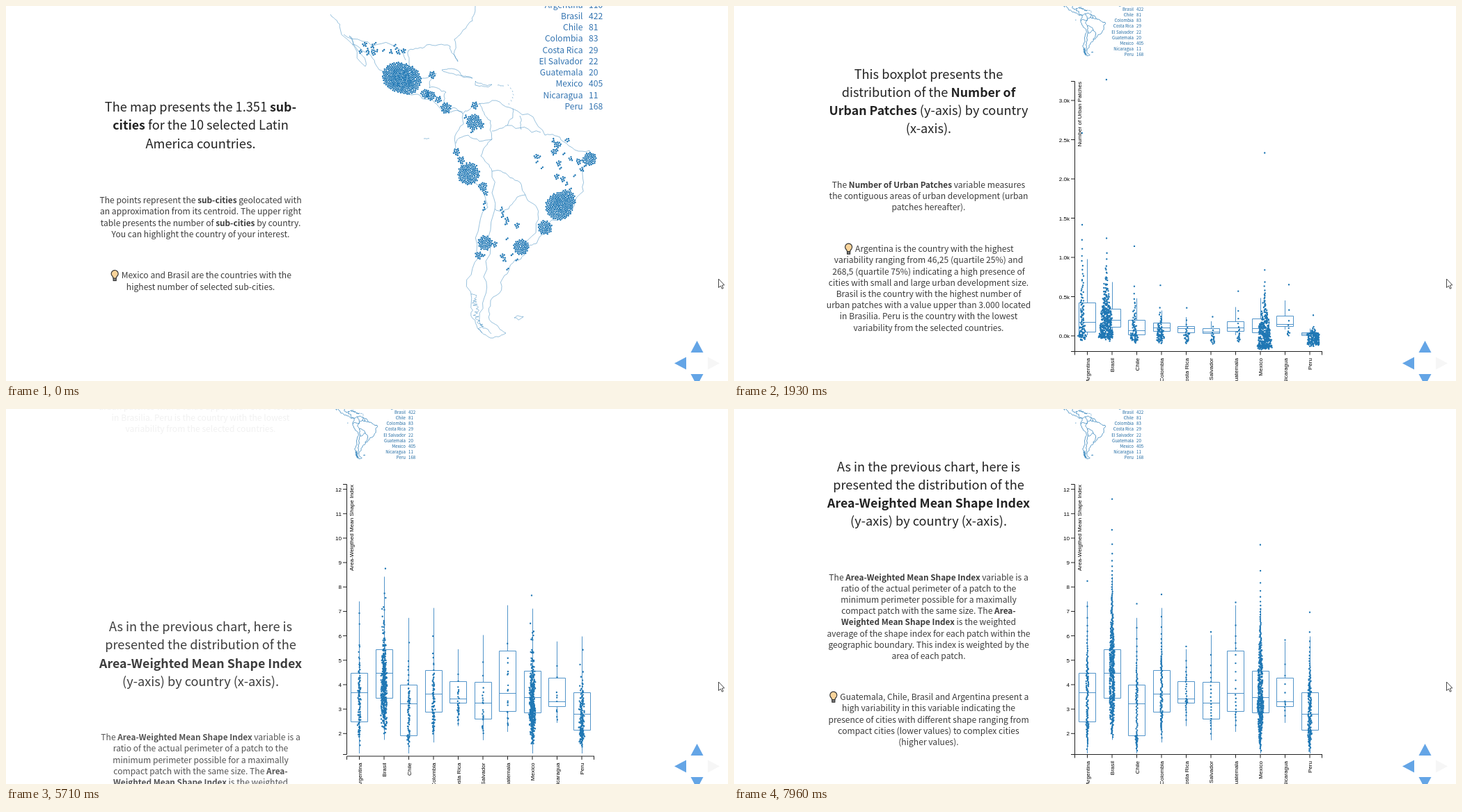
These frames come from a looping animation (1037x540 px, 8 s). An HTML page with a canvas:

```html
<!DOCTYPE html>
<html lang="en">
<head>
<meta charset="utf-8">
<title>Sub-cities</title>
<style>
html, body { margin: 0; width: 100%; height: 100%; overflow: hidden; background: #fff; }
canvas { display: block; }
</style>
</head>
<body>
<canvas id="stage" width="1037" height="540"></canvas>
<script>
const ctx = document.getElementById('stage').getContext('2d');
const SANS = '"Noto Sans CJK SC", "Noto Sans CJK JP", "Open Sans", sans-serif';
const ARIAL = '"Liberation Sans", sans-serif';
const BLUE = '#1f77b4', LOOP = 8000;

let seed = 7;
const rand = () => (seed = seed * 16807 % 2147483647) / 2147483647;
const ramp = (t, a, b) => Math.min(1, Math.max(0, (t - a) / (b - a)));
const smooth = u => u * u * (3 - 2 * u);
const mix = (a, b, k) => a + (b - a) * k;

// Damped spring from 0 to 1 with one visible overshoot
function spring(t, start) {
  const a = (t - start) * 0.0033;
  return a < 0 ? 0 : 1 - Math.exp(-0.637 * a) * (Math.cos(a) + 0.637 * Math.sin(a));
}

// cubic-bezier(.26, .86, .44, 1)
function slideEase(x) {
  let lo = 0, hi = 1, u = 0;
  for (let i = 0; i < 24; i++) {
    u = (lo + hi) / 2;
    const v = 1 - u;
    if (0.78 * v * v * u + 1.32 * v * u * u + u ** 3 < x) lo = u; else hi = u;
  }
  return 2.58 * (1 - u) ** 2 * u + 3 * (1 - u) * u * u + u ** 3;
}

/* ---------- countries ---------- */
// patch, shape: upper quartile, median, lower quartile as stage heights
// hubs: x, y, share of dots; the rest is strewn in the ellipse "wild"
const countries = [
  { name: 'Argentina', n: 110, patch: [427, 455, 469], shape: [380, 408, 450],
    hubs: [[740, 347, 0.56]], wild: [720, 335, 22, 48] },
  { name: 'Brasil', n: 422, patch: [436, 452, 462], shape: [346, 380, 416],
    hubs: [[794, 289, 0.42], [806, 277, 0.12], [774, 319, 0.12], [839, 220, 0.1]], wild: [796, 232, 40, 42] },
  { name: 'Chile', n: 81, patch: [452, 467, 473], shape: [397, 424, 470],
    hubs: [[688, 341, 0.62], [679, 359, 0.17]], wild: [687, 320, 4, 60] },
  { name: 'Colombia', n: 83, patch: [456, 463, 468], shape: [376, 410, 436],
    hubs: [[672, 167, 0.7], [673, 143, 0.15]], wild: [672, 165, 16, 18] },
  { name: 'Costa Rica', n: 29, patch: [461, 464, 470], shape: [392, 417, 423], hubs: [[632, 147, 1]] },
  { name: 'El Salvador', n: 22, patch: [464, 469, 471], shape: [393, 423, 446], hubs: [[610, 129, 1]] },
  { name: 'Guatemala', n: 20, patch: [454, 463, 468], shape: [348, 409, 435], hubs: [[602, 126, 1]] },
  { name: 'Mexico', n: 405, patch: [450, 464, 470], shape: [377, 415, 437],
    hubs: [[560, 101, 0.42], [577, 107, 0.42], [612, 99, 0.03]], wild: [538, 66, 38, 18] },
  { name: 'Nicaragua', n: 11, patch: [446, 458, 461], shape: [387, 421, 428], hubs: [[621, 135, 1]] },
  { name: 'Peru', n: 168, patch: [470, 472, 474], shape: [408, 439, 462],
    hubs: [[664, 242, 0.67], [685, 260, 0.12], [654, 222, 0.08], [647, 210, 0.07]], wild: [668, 236, 14, 20] }
];
const columnX = i => 507.5 + 35.5 * i;

/* ---------- dots ---------- */
// Push overlapping dots apart
function relax(pts, gap) {
  for (let pass = 0; pass < 40; pass++) {
    pts.forEach((p, i) => {
      for (let j = 0; j < i; j++) {
        const q = pts[j], dx = p[0] - q[0], dy = p[1] - q[1], d = Math.hypot(dx, dy);
        if (d >= gap || !d) continue;
        const k = (gap - d) / d / 2;
        p[0] += dx * k; p[1] += dy * k;
        q[0] -= dx * k; q[1] -= dy * k;
      }
    });
  }
  return pts;
}

function mapPoints({ n, hubs, wild }) {
  const pts = [];
  const clump = (x, y, size) => {
    for (let i = 0; i < size && pts.length < n; i++) {
      const r = 1.35 * Math.sqrt(i), w = i * 2.39996;
      pts.push([x + r * Math.cos(w), y + r * Math.sin(w)]);
    }
  };
  hubs.forEach(([x, y, share]) => clump(x, y, Math.round(share * n)));
  while (pts.length < n) {
    const [x, y, rx, ry] = wild, r = Math.sqrt(rand()), w = rand() * 6.283;
    clump(x + rx * r * Math.cos(w), y + ry * r * Math.sin(w), 1 + 7 * rand() ** 3);
  }
  return relax(pts, 2.6);
}

const whisker = ([q3, , q1], n) => Math.min(1.5 * (q1 - q3), 22 * Math.log(n));

// Height of the dot at quantile u; the tail is measured in whisker lengths
function heightAt(u, n, box, low, tail, outlier) {
  const room = n / 32, med = box[1];
  const q3 = Math.min(box[0], med - room), q1 = Math.max(box[2], med + room);
  const part = Math.floor(u * 4), v = u * 4 - part;
  if (part === 0) return mix(low, Math.min(q1, low - 3), Math.sqrt(v));
  if (part === 1) return mix(q1, med, v);
  if (part === 2) return mix(med, q3, v);
  const k = -Math.log(1 - v) / Math.log(n / 2);
  return q3 - whisker(box, n) * (tail * k + outlier * k ** 12);
}

// The denser the column at that height, the wider the swarm
function swarmSpot(c, rank, width, ...rule) {
  const { n } = countries[c], u = (rank + 0.5) / n;
  const y = v => heightAt(Math.min(1 - 0.5 / n, Math.max(0, v)), n, ...rule);
  const density = 0.04 * n / (Math.abs(y(u - 0.02) - y(u + 0.02)) + 0.1);
  const half = Math.max(0, Math.min(10, width * Math.sqrt(density) - 0.6));
  return [columnX(c) + half * (2 * rand() - 1), y(u)];
}

const shapeLow = ({ n, shape }) => Math.min(496, shape[2] + 10 * Math.log(n));
const dots = countries.flatMap((country, c) => {
  const { n, patch, shape } = country;
  const patchLow = Math.min(482, patch[2] + 2 * Math.log(n));
  return mapPoints(country).map((home, i) => [
    home,
    swarmSpot(c, (n - 1 + i * 61) % n, 3.2, patch, patchLow, 2.2 + n / 600, n / 78),
    swarmSpot(c, (i * 97 + 5) % n, 2.4, shape, shapeLow(country), 1 + n / 400, 0)
  ]);
});

function drawDots(t) {
  const k1 = spring(t, 506), k2 = spring(t, 5276);
  ctx.fillStyle = BLUE;
  ctx.beginPath();
  for (const [home, a, b] of dots) {
    const [x, y] = [0, 1].map(d => home[d] + k1 * (a[d] - home[d]) + k2 * (b[d] - a[d]));
    ctx.moveTo(x + 1.2, y);
    ctx.arc(x, y, 1.2, 0, 6.283);
  }
  ctx.fill();
}

/* ---------- map ---------- */
const outlines = [
  // Pacific, Atlantic, Gulf
  '466 12 480 33 516 87 508 66 493 43 510 62 532 86 546 108 575 125 606 134 629 152 656 155 657 170 643 208 664 248 688 268 692 290 679 362 668 430 676 460 700 478 718 471',
  '718 471 697 455 696 424 716 388 740 364 745 348 762 342 784 308 816 288 828 242 844 219 838 208 800 195 774 186 728 148 688 140 672 143 656 155',
  '656 153 634 148 632 124 608 118 618 97 592 108 576 92 578 64 604 56 638 58 649 80 644 48 664 26 674 0',
  // borders
  '485 41 540 54 574 78', '680 140 696 165 698 192 664 186 646 198',
  '698 192 682 216 698 238 728 248 746 272 722 292 702 292',
  '698 238 700 300 686 390 680 450 697 472', '698 180 720 172 768 182',
  '728 148 720 172', '738 158 740 178', '746 272 764 300 745 348',
  // islands
  '626 92 645 91 670 104 650 99 626 92', '674 108 698 113 674 114 674 108',
  '706 114 715 115', '600 191 608 191', '730 449 743 447 737 452 730 449'
].map(line => line.match(/\d+ \d+/g).map(p => p.split(' ').map(Number)));

// small islands in an arc, fjords as a zigzag
for (let i = 0; i < 7; i++) {
  const y = 113 + 4.5 * i, x = 721 + 7 * Math.sin(i / 2);
  outlines.push([[x, y], [x + 1, y + 2]]);
}
outlines.push(Array.from({ length: 36 }, (_, i) => [667 + i * i / 90 + 10 * rand(), 415 + 1.6 * i]));

// Roughen a line by pushing midpoints sideways
function roughen(pts) {
  return pts.flatMap(([x, y], i) => {
    if (!i) return [[x, y]];
    const [a, b] = pts[i - 1], k = (rand() - 0.5) * 0.36;
    return [[(a + x) / 2 + (y - b) * k, (b + y) / 2 + (a - x) * k], [x, y]];
  });
}

const land = new Path2D();
for (const line of outlines) {
  roughen(roughen(roughen(line))).forEach(([x, y], i) => i ? land.lineTo(x, y) : land.moveTo(x, y));
}

function drawMap(m) {
  const s = mix(1, 0.18, m);
  ctx.save();
  ctx.translate(382 * m, -14.2 * m);
  ctx.scale(s, s);
  ctx.strokeStyle = BLUE;
  ctx.lineWidth = mix(0.45, 0.75, m) / s;
  ctx.stroke(land);
  ctx.restore();

  const size = mix(12.1, 6.1, m), x = mix(828.5, 574, m);
  ctx.font = size + 'px ' + SANS;
  ctx.fillStyle = m < 0.5 ? '#3273b0' : '#1a66a0';
  countries.forEach(({ name, n }, i) => {
    const y = mix(14.5 + 16.25 * (i - 1), 4.5 + 8.2 * (i - 1), m) + size * 0.37;
    ctx.textAlign = 'right';
    ctx.fillText(name, x, y);
    ctx.textAlign = 'left';
    ctx.fillText(n, x + mix(8.5, 4, m), y);
  });
}

/* ---------- text slides: blocks of [first line y, lines] ---------- */
const slides = [
  { travel: 508, blocks: [
    [145.3, ['The map presents the 1.351 *sub-', '*cities* for the 10 selected Latin', 'America countries.']],
    [279.8, ['The points represent the *sub-cities* geolocated with',
      'an approximation from its centroid. The upper right',
      'table presents the number of *sub-cities* by country.',
      'You can highlight the country of your interest.']],
    [388, ['Mexico and Brasil are the countries with the', 'highest number of selected sub-cities.']]] },
  { travel: 662, blocks: [
    [97.8, ['This boxplot presents the', 'distribution of the *Number of', '*Urban Patches* (y-axis) by country', '(x-axis).']],
    [257.3, ['The *Number of Urban Patches* variable measures',
      'the contiguous areas of urban development (urban', 'patches hereafter).']],
    [349.6, ['Argentina is the country with the highest',
      'variability ranging from 46,25 (quartile 25%) and',
      '268,5 (quartile 75%) indicating a high presence of',
      'cities with small and large urban development size.',
      'Brasil is the country with the highest number of',
      'urban patches with a value upper than 3.000 located',
      'in Brasilia. Peru is the country with the lowest',
      'variability from the selected countries.']]] },
  { travel: 670, blocks: [
    [82.5, ['As in the previous chart, here is', 'presented the distribution of the',
      '*Area-Weighted Mean Shape Index', '(y-axis) by country (x-axis).']],
    [242, ['The *Area-Weighted Mean Shape Index* variable is a',
      'ratio of the actual perimeter of a patch to the',
      'minimum perimeter possible for a maximally',
      'compact patch with the same size. The *Area-',
      '*Weighted Mean Shape Index* is the weighted',
      'average of the shape index for each patch within the',
      'geographic boundary. This index is weighted by the',
      'area of each patch.']],
    [414.6, ['Guatemala, Chile, Brasil and Argentina present a',
      'high variability in this variable indicating the',
      'presence of cities with different shape ranging from',
      'compact cities (lower values) to complex cities',
      '(higher values).']]] }
];

// Centred line; * switches bold on and off. Returns the left edge.
function richLine(text, cx, y, size) {
  const parts = text.split('*');
  const font = i => (i % 2 ? '700 ' + size * 0.975 : '400 ' + size) + 'px ' + SANS;
  const widths = parts.map((s, i) => { ctx.font = font(i); return ctx.measureText(s).width; });
  const left = cx - widths.reduce((a, b) => a + b) / 2;
  let x = left;
  parts.forEach((s, i) => {
    ctx.font = font(i);
    ctx.fillText(s, x, y);
    x += widths[i];
  });
  return left;
}

function bulb(x, y) {
  ctx.lineWidth = 1.2;
  ctx.strokeStyle = '#333';
  ctx.fillStyle = '#888';
  ctx.fillRect(x - 2, y + 3, 4, 5);
  ctx.strokeRect(x - 2, y + 3, 4, 4.5);
  ctx.fillStyle = '#fad49b';
  ctx.beginPath();
  ctx.arc(x, y - 2.5, 5, 2.2, 0.94);
  ctx.lineTo(x + 2, y + 4);
  ctx.lineTo(x - 2, y + 4);
  ctx.closePath();
  ctx.fill();
  ctx.stroke();
}

function drawSlide(slide, dy, alpha) {
  if (alpha < 0.01) return;
  ctx.globalAlpha = alpha;
  ctx.textAlign = 'left';
  slide.blocks.forEach(([y0, lines], b) => {
    lines.forEach((text, i) => {
      const y = y0 + dy + i * (b ? 16.2 : 26.2), tip = b === 2 && !i;
      ctx.fillStyle = b ? '#3c3c3c' : '#222';
      const left = richLine(text, tip ? 287.8 : 279.5, y + (b ? 4.5 : 7), b ? 12.1 : 18.2);
      if (tip) bulb(left - 9.5, y);
    });
  });
  ctx.globalAlpha = 1;
}

function drawSlides(t) {
  const from = t < 5504 ? 0 : 1, start = from ? 5504 : 645;
  const rest = 1 - slideEase(ramp(t, start, start + 800));
  drawSlide(slides[from], (rest - 1) * slides[from].travel, rest ** 2.5);
  drawSlide(slides[from + 1], rest * slides[from + 1].travel, 1 - rest ** 2);
}

/* ---------- charts ---------- */
function segment(x1, y1, x2, y2) {
  ctx.moveTo(x1, y1);
  ctx.lineTo(x2, y2);
}

function sideways(text, x, y) {
  ctx.save();
  ctx.translate(x, y);
  ctx.rotate(-Math.PI / 2);
  ctx.fillText(text, 0, 0);
  ctx.restore();
}

function axisStyle(alpha) {
  ctx.globalAlpha = alpha;
  ctx.strokeStyle = '#222';
  ctx.fillStyle = '#000';
  ctx.lineWidth = 1;
  ctx.font = '8.1px ' + ARIAL;
  ctx.textAlign = 'right';
  ctx.beginPath();
}

function xAxis(alpha, labelAlpha, dy) {
  axisStyle(alpha);
  const y = 497.5 + dy;
  segment(489.5, y, 845, y);
  [489.5, 844.5, ...countries.map((_, i) => columnX(i))].forEach(x => segment(x, y, x, y + 5));
  ctx.stroke();
  ctx.globalAlpha = labelAlpha;
  countries.forEach(({ name }, i) => sideways(name, columnX(i) + 3.2, y + 9.5));
  ctx.globalAlpha = 1;
}

function chart(alpha, title, ticks, key, lowest) {
  if (!alpha) return;
  axisStyle(alpha);
  segment(489.5, 108.5, 489.5, 497.5);
  segment(484, 108.5, 489.5, 108.5);
  segment(484, 497.5, 489.5, 497.5);
  ticks.forEach(([label, y]) => {
    segment(484, y, 489.5, y);
    ctx.fillText(label, 482, y + 3);
  });
  ctx.stroke();
  sideways(title, 498.8, 109);

  ctx.strokeStyle = '#4089c4';
  ctx.lineWidth = 0.9;
  ctx.beginPath();
  countries.forEach((country, i) => {
    const x = Math.floor(columnX(i)) + 0.5, [q3, med, q1] = country[key].map(v => v + 0.5);
    ctx.rect(x - 12, q3, 24, q1 - q3);
    segment(x - 12, med, x + 12, med);
    segment(x, q3 - whisker(country[key], country.n), x, q3);
    segment(x, q1, x, lowest(country));
  });
  ctx.stroke();
  ctx.globalAlpha = 1;
}

const patchTicks = Array.from({ length: 7 }, (_, i) => [(i / 2).toFixed(1) + 'k', 475 - 56.5 * i]);
const shapeTicks = Array.from({ length: 11 }, (_, i) => [i + 2, 467.3 - 35.17 * i]);
const patchLowest = ({ n, patch }) => Math.min(474, patch[2] + 2 * Math.log(n));

/* ---------- controls ---------- */
function polygon(points, fill) {
  ctx.beginPath();
  points.forEach(([x, y]) => ctx.lineTo(x, y));
  ctx.closePath();
  ctx.fillStyle = fill;
  ctx.fill();
}

function drawControls() {
  for (let i = 0; i < 4; i++) {
    const w = i * Math.PI / 2, c = Math.cos(w), s = Math.sin(w);
    const at = (out, across) => [992.5 + c * out - s * across, 514.5 + s * out + c * across];
    polygon([at(32.5, 0), at(15.5, 9), at(15.5, -9)], i ? '#64a5e6' : '#f6f6f6');
  }
  polygon([[1023.5, 393], [1023.5, 405.5], [1026.4, 403], [1028.4, 407.2],
    [1030.2, 406.4], [1028.4, 402.2], [1031.8, 401.8]], '#fff');
  ctx.strokeStyle = '#333';
  ctx.lineWidth = 0.9;
  ctx.stroke();
}

function frame() {
  const t = performance.now() % LOOP;
  ctx.fillStyle = '#fff';
  ctx.fillRect(0, 0, 1037, 540);
  drawMap(smooth(ramp(t, 380, 860)));
  const shown = ramp(t, 430, 800);
  xAxis(shown, ramp(t, 640, 820), 2.5 * Math.sin(Math.PI * ramp(t, 5280, 6180)));
  chart(shown * (1 - ramp(t, 5200, 5450)), 'Number of Urban Patches', patchTicks, 'patch', patchLowest);
  chart(ramp(t, 5260, 5600), 'Area-Weigthed Mean Shape Index', shapeTicks, 'shape', shapeLow);
  drawDots(t);
  drawSlides(t);
  drawControls();
  requestAnimationFrame(frame);
}
frame();
</script>
</body>
</html>
```
